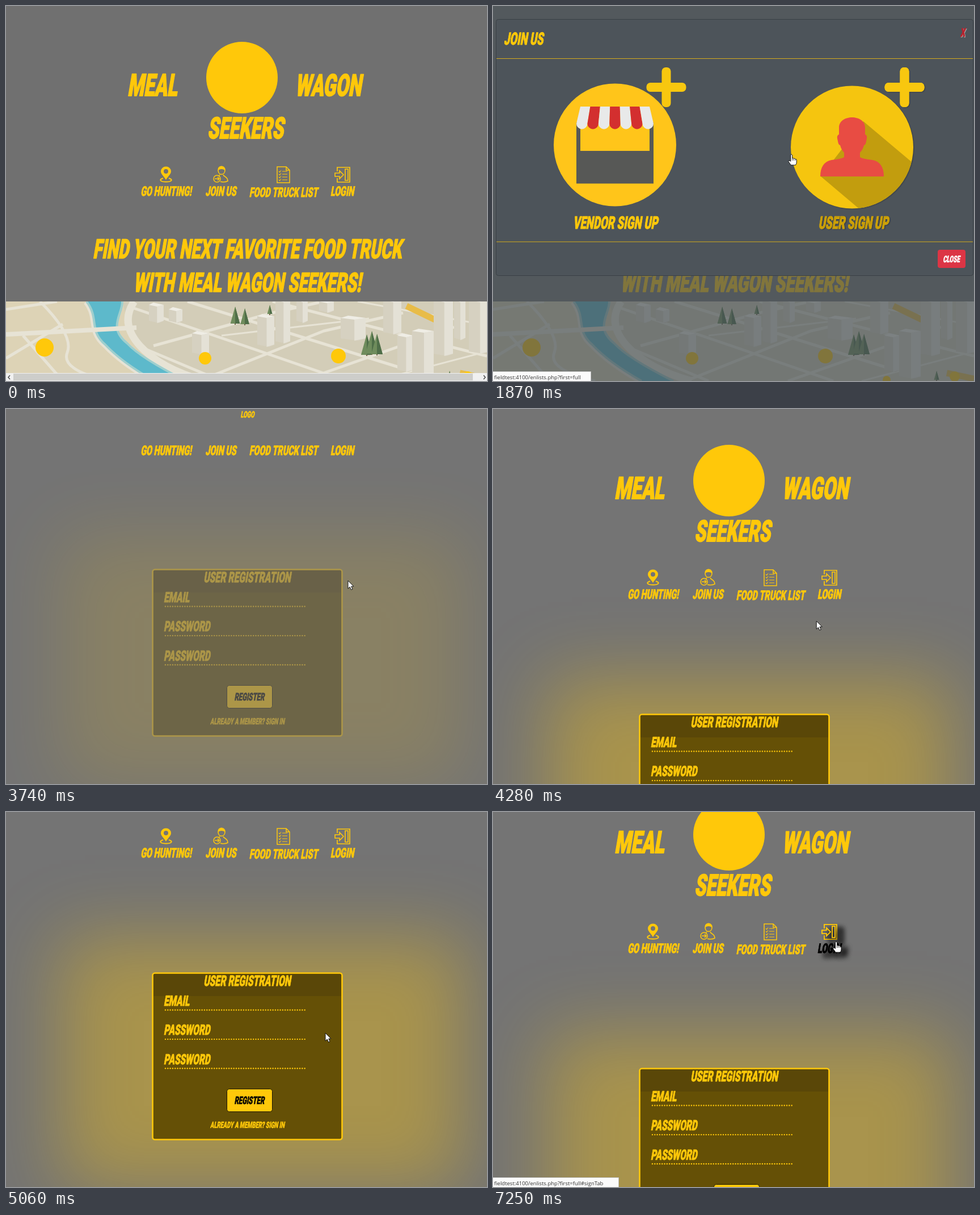
These frames come from a looping animation (848x660 px, 8000 ms). An HTML page with a canvas:

```html
<!DOCTYPE html>
<html lang="en">
<head>
<meta charset="utf-8">
<title>Food finder</title>
<style>
html, body { margin: 0; width: 100%; height: 100%; overflow: hidden; background: #707070; }
canvas { display: block; }
</style>
</head>
<body>
<canvas id="stage" width="848" height="660"></canvas>
<script>
const W = 848, H = 660, LOOP = 8000, TAU = Math.PI * 2;
const YELLOW = '#ffc80a', HOME_BG = '#707070', FORM_BG = '#747474';
const HOST = 'fieldtest:4100/';
const SIGN_URL = HOST + 'enlists.php?first=full';
const main = document.getElementById('stage').getContext('2d');
let c = main;
let t = 0;

const clamp = v => Math.max(0, Math.min(1, v));
const span = (a, b) => clamp((t - a) / (b - a));
const smooth = p => p * p * (3 - 2 * p);
const within = (a, b) => t >= a && t < b;

function layer(w, h, draw) {
  const el = document.createElement('canvas');
  el.width = w;
  el.height = h;
  const prev = c;
  c = el.getContext('2d');
  draw();
  c = prev;
  return el;
}

function box(x, y, w, h, fill, r = 0, stroke, lw = 1) {
  c.beginPath();
  c.roundRect(x, y, w, h, r);
  if (fill) { c.fillStyle = fill; c.fill(); }
  if (stroke) { c.strokeStyle = stroke; c.lineWidth = lw; c.stroke(); }
}

function disc(x, y, r, fill) {
  c.beginPath();
  c.arc(x, y, r, 0, TAU);
  c.fillStyle = fill;
  c.fill();
}

function shape(pts, fill) {
  c.beginPath();
  pts.forEach(p => c.lineTo(p[0], p[1]));
  c.closePath();
  c.fillStyle = fill;
  c.fill();
}

function line(path, color, lw) {
  c.strokeStyle = color;
  c.lineWidth = lw;
  c.stroke(new Path2D(path));
}

// Heavy, narrow, slanted display lettering; y is the middle of the capitals.
function comic(str, x, y, size, color = YELLOW, align = 'center') {
  c.save();
  c.translate(x - (align === 'center' ? size * 0.06 : 0), y + size * 0.355);
  c.transform(0.61, 0, -0.17, 1, 0, 0);
  c.font = `900 ${size}px Roboto, "Open Sans", sans-serif`;
  c.textAlign = align;
  c.lineJoin = 'round';
  c.lineWidth = size * 0.035;
  c.strokeStyle = c.fillStyle = color;
  c.fillText(str, 0, 0);
  c.strokeText(str, 0, 0);
  c.restore();
}

function lift(k) {
  c.shadowColor = `rgba(0,0,0,${k})`;
  c.shadowOffsetX = 10 * k;
  c.shadowOffsetY = 7 * k;
  c.shadowBlur = 8 * k;
}

const darken = k => `rgb(${255 * (1 - k)},${200 * (1 - k)},${10 * (1 - k)})`;

// ---- navigation ----
const icons = [
  () => {
    c.fillStyle = YELLOW;
    c.fill(new Path2D('M282 306C278 299 273 296 273 291A9 8.500 0 0 1 291 291C291 296 286 299 282 306ZM286 291A4 4 0 1 0 278 291A4 4 0 1 0 286 291Z'), 'evenodd');
    line('M277 303C268 306 273 309.500 282 309.500S296 306 287 303', YELLOW, 2);
  },
  () => {
    line('M374 290C373 280 386 280 386 289C386 298 375 299 374 290Z', YELLOW, 1.6);
    line('M383 297C384 301 391 300 391 308Q385 311 378 309M377 297L375 299', YELLOW, 1.6);
    line('M378 304A6 6 0 1 0 366 304A6 6 0 1 0 378 304ZM368 304H375M373 301L376 304L373 307', YELLOW, 1.5);
    c.fillStyle = YELLOW;
    c.fill(new Path2D('M374 289C373 281 386 281 386 289Q380 285 374 289Z'));
  },
  () => {
    line('M478 283H494L500 289V311H478ZM494 283V289H500', YELLOW, 1.5);
    for (let i = 0; i < 4; i++) {
      const y = 291 + i * 5;
      line(`M481 ${y}l1.500 1.500l2.500 -3M487 ${y}H496`, YELLOW, 1.1);
    }
  },
  () => {
    line('M584 291V284H606V310H584V303', YELLOW, 1.7);
    line('M598 287H603V307H598ZM580 294H588V290L595 297L588 304V300H580Z', YELLOW, 1.6);
  }
];
const labels = [['GO HUNTING!', 283.5], ['JOIN US', 380], ['FOOD TRUCK LIST', 490.5], ['LOGIN', 594]];

function nav(y, full, hot, k) {
  labels.forEach(([name, x], i) => {
    const h = i === hot ? k : 0;
    c.save();
    if (h) lift(h);
    if (full) icons[i]();
    if (full && h) icons[i]();
    comic(name, x, y + (full && i === 2 ? 1.5 : 0), 23.5, darken(h));
    c.restore();
  });
}

function header(hot, k) {
  disc(416, 126, 63, YELLOW);
  comic('MEAL', 214, 139, 54, YELLOW, 'left');
  comic('WAGON', 571, 139, 53);
  comic('SEEKERS', 425, 215, 52);
  nav(326, true, hot, k);
}

// ---- home page ----
const river = new Path2D('M142 0C165 30 145 50 175 76Q205 108 262 140H318Q238 100 214 74C178 46 206 22 205 0Z');

function block(x, y, w, h) {
  const d = w * 0.3;
  shape([[x, y + 4], [x + d, y], [x + w, y + 4], [x + w, y + h], [x + w - d, y + h + 4], [x, y + h]], '#d6d1c1');
  shape([[x + w * 0.55, y + 7], [x + w, y + 4], [x + w, y + h], [x + w * 0.55, y + h + 4]], '#e4e1d6');
  shape([[x, y + 4], [x + d, y], [x + w, y + 4], [x + w * 0.55, y + 7]], '#efede5');
}

function tree(x, y, h) {
  box(x - 1, y + h - 3, 2, 5, '#75634a');
  shape([[x, y], [x + h * 0.28, y + h], [x - h * 0.28, y + h]], '#6f8c5c');
  shape([[x, y], [x + h * 0.28, y + h], [x, y + h]], '#4f6e48');
}

const map = layer(W, 140, () => {
  box(0, 0, W, 140, '#ddd3b6');
  shape([[205, 0], [W, 0], [W, 140], [320, 140], [225, 75]], '#d3cdb8');
  c.lineJoin = 'round';
  const cream = '#e7e3d5';
  line('M0 14L90 0M60 0Q120 60 108 90T180 140M0 100L100 40M100 140L30 60', cream, 5);
  line('M226 0Q200 38 236 78T350 140', cream, 13);
  line('M220 10L420 78L600 140M320 0L700 118M470 0L848 96M260 78L470 20L560 0M340 140L560 52L700 20M520 140L790 45M232 78L380 140', cream, 5);
  line('M620 0L848 42M380 60L640 30M650 140L848 88', cream, 3);
  line('M706 8L756 32M800 126L848 136', '#e8bc48', 11);
  line('M142 0C165 30 145 50 175 76Q205 108 262 140', cream, 12);
  c.fillStyle = '#5db9cb';
  c.fill(river);
  line('M142 0C165 30 145 50 175 76Q205 108 262 140M205 0C206 22 178 46 214 74Q238 100 318 140', '#9fcfce', 4);
  line('M0 58L135 51L230 46', cream, 8);
  [[252, 2, 26, 32], [287, 10, 24, 24], [328, 52, 30, 38], [443, 22, 30, 54], [475, -6, 26, 76],
   [512, -6, 20, 40], [552, -4, 26, 20], [590, 25, 44, 40], [665, -6, 32, 60], [754, -6, 34, 98],
   [790, -6, 20, 70], [816, -6, 36, 94], [690, 56, 28, 64], [716, 48, 38, 84]].forEach(b => block(...b));
  [[404, 9, 30], [421, 12, 28], [465, 6, 16], [636, 58, 36], [645, 52, 40], [654, 57, 36], [782, 122, 16]].forEach(p => tree(...p));
  [[68, 81, 16], [351, 100, 11], [586, 96, 13], [694, 138, 7], [814, 132, 9]].forEach(p => disc(...p, YELLOW));
});

function scrollbar() {
  box(0, 646, W, 14, '#f0f0f0');
  box(13, 647, 810, 12, '#cdcdca');
  line('M7 650L4 653.500L7 657M842 650L845 653.500L842 657', '#505050', 1.6);
}

function home() {
  box(0, 0, W, H, HOME_BG);
  header(1, span(740, 960) * (1 - span(1250, 1400)));
  comic('FIND YOUR NEXT FAVORITE FOOD TRUCK', 428, 427, 47);
  comic('WITH MEAL WAGON SEEKERS!', 428, 486, 47);
  c.drawImage(map, 0, 520);
  if (t < 1150) scrollbar();
  else modal(span(1120, 1420));
}

// ---- sign-up dialog ----
function plus(x, y) {
  c.beginPath();
  c.roundRect(x - 35, y - 8, 70, 16, 7);
  c.roundRect(x - 8, y - 35, 16, 70, 7);
  c.fillStyle = '#f8c70f';
  c.fill();
}

function vendor() {
  disc(215, 244.5, 108, '#ffc51a');
  box(147, 205, 7, 60, '#575856');
  box(276, 205, 7, 60, '#575856');
  box(147, 255, 136, 57.5, '#575856');
  const w = 136 / 7, tw = 122 / 7;
  for (let i = 0; i < 7; i++) {
    const x = 147 + i * w, tx = 154 + i * tw;
    c.beginPath();
    c.moveTo(tx, 177);
    c.lineTo(tx + tw, 177);
    c.lineTo(x + w, 207);
    c.arc(x + w / 2, 207, w / 2, 0, Math.PI);
    c.closePath();
    c.fillStyle = i % 2 ? '#d32f2f' : '#e8e9e9';
    c.fill();
  }
  plus(305.5, 143);
  comic('VENDOR SIGN UP', 217.5, 381, 30.5);
}

function user(k) {
  c.save();
  lift(k);
  plus(725.5, 143);
  disc(633, 248.5, 108, '#f5c50f');
  comic('USER SIGN UP', 637, 381, 30.5, darken(k));
  c.restore();
  plus(725.5, 143);
  c.save();
  c.beginPath();
  c.arc(633, 248.5, 108, 0, TAU);
  c.clip();
  shape([[653, 203], [760, 293], [760, 370], [661, 370], [578, 300]], '#c29d0e');
  c.restore();
  c.fillStyle = '#e84c43';
  c.fill(new Path2D('M610 226V214C610 190 656 190 656 214V226Q661 227 658 238Q657 245 654 245Q652 253 647 258V266Q651 269 669 271Q689 275 689 300H577Q577 275 597 271Q615 269 619 266V258Q614 253 612 245Q609 245 608 238Q605 227 610 226Z'));
}

function modal(k) {
  box(0, 0, W, H, `rgba(70,78,84,${0.68 * k})`);
  c.save();
  c.globalAlpha = k;
  c.translate(0, -50 * (1 - smooth(k)));
  box(5.5, 23.5, 841, 451, '#4d545a', 4, '#3a4045');
  box(6, 92, 840, 1, '#d4aa1c');
  box(6, 414.5, 840, 1, '#d4aa1c');
  comic('JOIN US', 19, 57, 30, YELLOW, 'left');
  comic('X', 830, 48, 21, '#a9a9a9');
  comic('X', 829, 47, 21, '#b8202c');
  vendor();
  user(span(1790, 2260));
  box(784, 429, 49, 32, '#dc3545', 4);
  comic('CLOSE', 809, 445, 16, '#fff');
  c.restore();
}

// ---- registration page ----
const FORM_Y = 219;
const panel = layer(W, 760, () => {
  c.shadowColor = 'rgba(255,201,14,.38)';
  c.shadowBlur = 120;
  c.shadowOffsetX = 2000;
  c.fillRect(97 - 2000, 159, 710, 442);
  c.shadowColor = 'transparent';
  c.translate(0, FORM_Y);
  box(258.5, 1.5, 334, 293, '#655006', 4);
  box(260, 3, 331, 39, '#5a4708');
  box(258.5, 1.5, 334, 293, null, 4, YELLOW, 2.6);
  comic('USER REGISTRATION', 426.5, 15, 25.7);
  ['EMAIL', 'PASSWORD', 'PASSWORD'].forEach((name, i) => {
    const y = 50 + i * 51.4;
    comic(name, 278, y, 25, YELLOW, 'left');
    for (let x = 281; x < 528; x += 4.31) disc(x, y + 16.5, 1.2, YELLOW);
  });
  box(389.5, 205.5, 80, 40, YELLOW, 4, '#1c1703');
  comic('REGISTER', 430, 225, 18.6, '#0c0a02');
  comic('ALREADY A MEMBER? SIGN IN', 426.5, 269, 15.3);
});

function scroll() {
  if (t < 5960) return 254 * (1 - Math.pow(1 - span(4510, 5060), 1.6));
  return 254 - 168 * smooth(span(5960, 6700));
}

function register() {
  box(0, 0, W, H, FORM_BG);
  const loaded = t >= 3820;
  const s = loaded ? Math.round(scroll()) : 255;
  c.save();
  c.globalAlpha = span(3580, 3980);
  c.drawImage(panel, 0, 536 - s - FORM_Y);
  c.restore();
  if (loaded) {
    c.save();
    c.translate(0, -s);
    header(3, span(7000, 7250));
    c.restore();
  } else if (t >= 3510) {
    comic('LOGO', 426.5, 9, 15.5);
    nav(72.5, false);
  }
}

// ---- browser status and pointer ----
function status(str, w) {
  box(-1, 643.5, w + 0.5, 18, '#fbfbfb', 0, '#c4c4c4');
  c.font = '9.5px "Open Sans", "Noto Sans", sans-serif';
  c.textAlign = 'left';
  c.fillStyle = '#333';
  c.fillText(str, 2, 656.5);
}

const track = [
  [230, 664, 400], [900, 382, 322], [1300, 382, 322], [1870, 526, 261], [2260, 620, 256],
  [2570, 620, 256], [2790, 637, 270], [3600, 637, 270], [3740, 603, 302], [4400, 563, 389],
  [6770, 563, 389], [7120, 605, 228], [LOOP, 605, 228]
];
const arrow = new Path2D('M0 0V14L3.300 11L5.500 16L8 15L5.800 10H10Z');
const hand = new Path2D('M-1.500 1.500Q0 -1 1.500 1.500V7Q3 6 4 7.500Q6 6.500 6.800 8.500Q9 8 9 10.500V14Q9 17 7 19H-1Q-3 16 -5.500 12.500Q-5 10 -2.500 11.500L-1.500 12.500Z');

function pointer() {
  if (t < 230) return;
  const i = track.findIndex(p => p[0] > t);
  const a = track[i - 1], b = track[i], p = span(a[0], b[0]);
  const link = within(740, 1250) || within(1790, 3210) || t >= 7000;
  const path = link ? hand : arrow;
  c.save();
  c.translate(a[1] + (b[1] - a[1]) * p, a[2] + (b[2] - a[2]) * p);
  c.lineJoin = 'round';
  c.fillStyle = '#fff';
  c.fill(path);
  c.strokeStyle = '#111';
  c.lineWidth = 1;
  c.stroke(path);
  if (link) line('M1.500 7V11M4 8V11M6.800 9V11', '#111', 0.8);
  c.restore();
}

const start = performance.now();

function frame(now) {
  t = Math.max(0, now - start) % LOOP;
  if (t < 3370) home();
  else register();
  if (within(740, 1250)) status(HOST + 'main.php#signTab', 148);
  else if (within(1790, 3210)) status(SIGN_URL, 173);
  else if (within(3210, 3370)) status('Looking up fieldtest...', 220);
  else if (t >= 7000) status(SIGN_URL + '#signTab', 222);
  pointer();
  requestAnimationFrame(frame);
}

requestAnimationFrame(frame);
</script>
</body>
</html>
```
